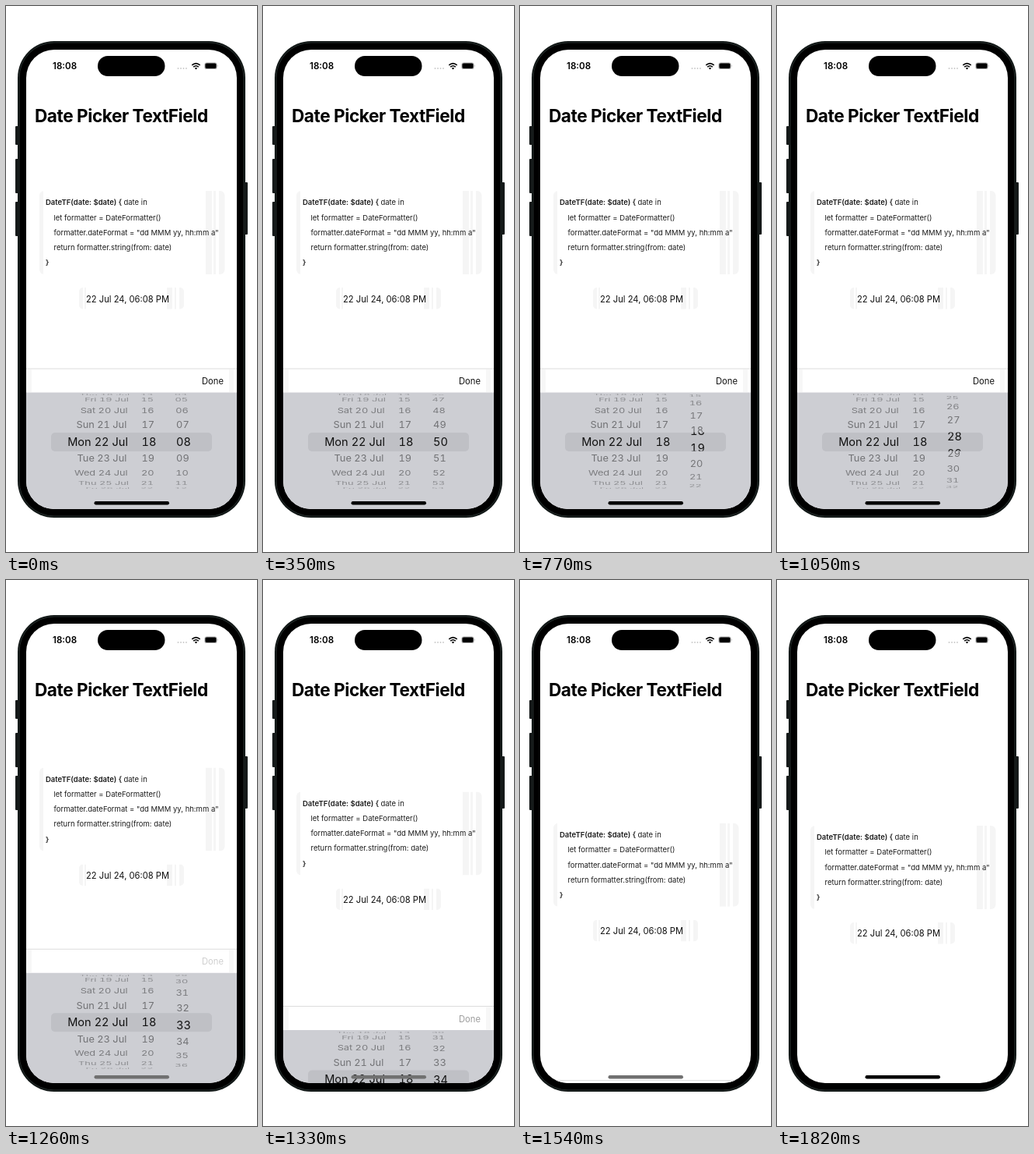
These frames come from a looping animation (323 by 700 pixels, 2.86 s). An HTML page:

```html
<!DOCTYPE html>
<html lang="en">
<head>
<meta charset="utf-8">
<title>Date picker</title>
<style>
  html, body { margin: 0; width: 100%; height: 100%; overflow: hidden; background: #fff; }
  svg { display: block; width: 323px; height: 700px; font-family: Inter, Roboto, sans-serif; }
  text { white-space: pre; }
  .title { font-size: 22.6px; font-weight: 700; letter-spacing: -.02em; }
  .code { font-size: 9.5px; fill: #1c1c1c; }
  .bold { font-weight: 600; }
  .label { font-size: 11.2px; fill: #111; }
  .wheel { font-variant-numeric: tabular-nums; }
  .side { font-size: 12.8px; }
  .chosen { font-size: 14.6px; fill: #111; }
</style>
</head>
<body>
<svg viewBox="0 0 323 700">
  <defs>
    <clipPath id="screen"><rect x="26" y="56" width="271" height="589" rx="36"/></clipPath>
    <clipPath id="codeBox"><rect x="43" y="237" width="238.500" height="107" rx="6"/></clipPath>
    <clipPath id="fieldBox"><rect x="94" y="361" width="135" height="27.500" rx="5"/></clipPath>
    <clipPath id="outsideBand"><path d="M0-64H323V-12H0ZM0 12H323V64H0Z"/></clipPath>
    <clipPath id="insideBand"><rect y="-12" width="323" height="24"/></clipPath>
  </defs>

  <g fill="#161a1a">
    <rect x="12" y="154" width="5" height="24" rx="1"/>
    <rect x="12" y="196" width="5" height="44" rx="1"/>
    <rect x="12" y="251" width="5" height="44" rx="1"/>
    <rect x="306" y="226" width="5" height="67" rx="1"/>
  </g>
  <rect x="15" y="45" width="293" height="611" rx="47" fill="#101615"/>
  <rect x="17" y="47" width="289" height="607" rx="45" stroke="#242b2a"/>
  <rect x="26" y="56" width="271" height="589" rx="36" fill="#fff"/>

  <g clip-path="url(#screen)">
    <text x="37" y="149" class="title">Date Picker TextField</text>

    <g id="content">
      <path clip-path="url(#codeBox)" fill="#f5f5f5" d="M43 237h5v107h-5ZM257 237h8v107h-8ZM267 237h3v107h-3ZM274 237h8v107h-8Z"/>
      <path clip-path="url(#fieldBox)" fill="#f5f5f5" d="M94 361h5v28h-5ZM101 361h2v28h-2ZM207 361h7v28h-7ZM217 361h2v28h-2ZM223 361h6v28h-6Z"/>
      <g class="code">
        <text x="51" y="255.300"><tspan class="bold">DateTF(date: $date) { </tspan>date in</text>
        <text x="61.500" y="274.500">let formatter = DateFormatter()</text>
        <text x="61.500" y="293.700">formatter.dateFormat = "dd MMM yy, hh:mm a"</text>
        <text x="61.500" y="312.900">return formatter.string(from: date)</text>
        <text x="51" y="332.100" class="bold">}</text>
      </g>
      <text x="103" y="379.500" class="label">22 Jul 24, 06:08 PM</text>
    </g>

    <g id="keyboard">
      <rect x="26" y="465" width="271" height="31" fill="#fff"/>
      <path d="M27 466h6v29h-6ZM287 466h6v29h-6Z" fill="#f7f7f7"/>
      <path d="M26 465H297" stroke="#dcdcdc"/>
      <text id="done" x="252" y="485" class="label">Done</text>
      <rect x="26" y="495.500" width="271" height="151" fill="#cdced3"/>
      <rect x="58" y="547" width="207" height="24" rx="5" fill="#bfc0c5"/>
      <g class="wheel" transform="translate(0 558.5)">
        <g id="sideRows" class="side" clip-path="url(#outsideBand)"></g>
        <g id="chosenRows" class="chosen" clip-path="url(#insideBand)"></g>
      </g>
    </g>
    <rect id="homeBar" x="113.500" y="635" width="96.500" height="4.500" rx="2.200"/>
  </g>

  <text x="60" y="81" font-size="11.600" font-weight="600">18:08</text>
  <rect x="118" y="64" width="86.500" height="26" rx="13"/>
  <g fill="#c8c8c8">
    <circle cx="221.500" cy="80" r=".9"/><circle cx="225" cy="80" r=".9"/>
    <circle cx="228.500" cy="80" r=".9"/><circle cx="232" cy="80" r=".9"/>
  </g>
  <path d="M239.300 75.900Q244.500 71.200 249.700 75.900M241.200 78.200Q244.500 75.300 247.800 78.200" fill="none" stroke="#000" stroke-width="1.600"/>
  <path d="M242.700 79.600Q244.500 78.200 246.300 79.600L244.500 81.500Z"/>
  <rect x="255.500" y="72.500" width="16" height="8.500" rx="2.600" fill="#aaa"/>
  <rect x="256.500" y="73.500" width="14" height="6.500" rx="1.800"/>
  <path d="M272.300 75.300q1.300 1.500 0 3Z" fill="#aaa"/>
</svg>
<script>
const LOOP = 2860, STEP = 70, LAST = 1820;
const RADIUS = 60, ROW_ANGLE = 0.366, REACH = 4;
const DAYS = ['Thu', 'Fri', 'Sat', 'Sun', 'Mon', 'Tue', 'Wed', 'Thu', 'Fri'];
const byId = id => document.getElementById(id);
const twoDigits = n => String(n).padStart(2, '0');

function addText(parent, anchor, baseline) {
  const el = document.createElementNS('http://www.w3.org/2000/svg', 'text');
  el.setAttribute('text-anchor', anchor);
  el.setAttribute('y', baseline);
  return parent.appendChild(el);
}

// One column: rows on a cylinder, plus flat enlarged rows seen inside the band.
function makeColumn(anchor, chosenX, sideX, label) {
  const rows = [];
  for (let i = -REACH; i <= REACH; i++) {
    rows.push({
      i,
      side: addText(byId('sideRows'), anchor, 4.6),
      chosen: addText(byId('chosenRows'), anchor, 5.3)
    });
  }
  return position => {
    const base = Math.round(position);
    for (const { i, side, chosen } of rows) {
      const distance = base + i - position;
      const angle = distance * ROW_ANGLE;
      const squash = Math.max(0, Math.cos(angle));
      side.textContent = chosen.textContent = label(base + i);
      side.setAttribute('transform',
        `translate(${sideX(Math.abs(distance))} ${RADIUS * Math.sin(angle)}) scale(1 ${squash})`);
      side.setAttribute('opacity', squash < 0.05 ? 0 : 0.2 + 0.27 * squash);
      chosen.setAttribute('transform', `translate(${chosenX} ${distance * 22})`);
    }
  };
}

const setDay = makeColumn('end', 157, d => 154 + 1.3 * d, n => `${DAYS[n - 18]} ${n} Jul`);
const setHour = makeColumn('middle', 184, d => 183.3 - 0.5 * d, n => twoDigits(n % 24));
const setMinute = makeColumn('middle', 228.5, d => 228.2 - 0.8 * d, n => twoDigits(n % 60));
setDay(22);
setHour(18);

const minuteAt = t => t < STEP ? 8 : 102.1 - 101.2 * Math.exp(-t / 527);

// Critically damped spring from 0 to 1.
function dismissAt(t) {
  const x = Math.max(0, t - 1240) * 0.0167;
  return 1 - (1 + x) * Math.exp(-x);
}

function doneOpacity(t) {
  if (t < 1190) return 1;
  return Math.min(1, 0.2 + Math.max(0, t - 1260) * 0.003);
}

function draw(time) {
  const t = Math.min(Math.floor(time / STEP) * STEP, LAST);
  const gone = dismissAt(t);
  setMinute(minuteAt(t));
  byId('content').setAttribute('transform', `translate(0 ${78 * gone})`);
  byId('keyboard').setAttribute('transform', `translate(0 ${184 * gone})`);
  byId('done').setAttribute('opacity', doneOpacity(t));
  byId('homeBar').setAttribute('fill', t >= 1260 && t < 1750 ? '#707070' : '#000');
}

const start = performance.now();
function tick() {
  draw((performance.now() - start) % LOOP);
  requestAnimationFrame(tick);
}
tick();
</script>
</body>
</html>
```
